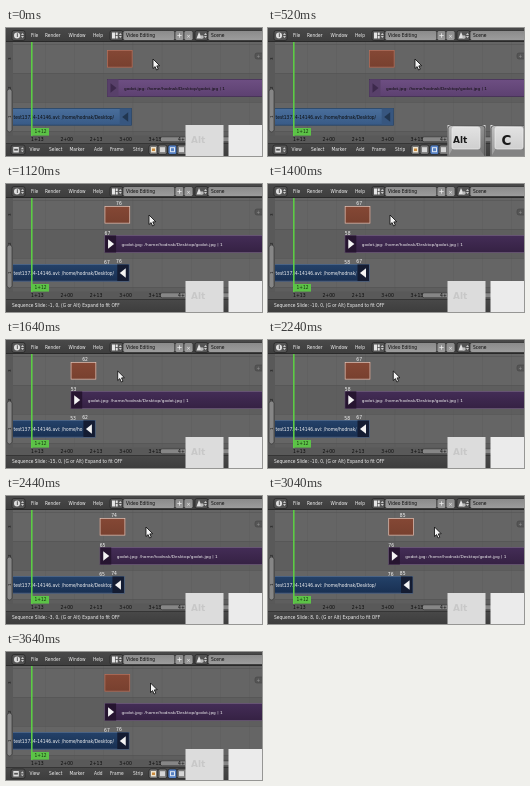
Recreate the animation shown at these times as an HTML page with a canvas. Size 256 px wide and 128 px high, loop 3880 ms.

```html
<!DOCTYPE html>
<html lang="en">
<head>
<meta charset="utf-8">
<title>Sequencer slide</title>
<style>
html, body { margin: 0; width: 100%; height: 100%; overflow: hidden; background: #555; }
canvas { display: block; width: 256px; height: 128px; }
</style>
</head>
<body>
<canvas id="stage" width="256" height="128"></canvas>
<script>
const g = document.getElementById('stage').getContext('2d');
const LOOP = 3880, STEP = 40, FRAME_W = 2.42;
const SELECT_AT = 600, GRAB_AT = 1000, DROP_AT = 3600;
const PATH = '/home/hodnak/Desktop';

// Time and value pairs
const slide = [[0, 0], [1000, 0], [1120, -1], [1400, -10], [1640, -15], [2080, -15],
  [2440, -3], [2680, 5], [2880, 8], [3040, 8], [3320, 3], [3560, -1], [LOOP, -1]];
const pointer = [[0, 147], [960, 147], [1120, 143], [1400, 122], [1680, 110], [2000, 110],
  [2080, 113.5], [2440, 140], [2680, 159], [2880, 166.5], [3040, 166.5], [3320, 154],
  [3560, 144.5], [LOOP, 144.5]];
const keyFade = [[0, 0], [120, 0], [360, 1], [600, 1], [840, 0], [LOOP, 0]];

function at(track, t) {
  let i = 1;
  while (i < track.length - 1 && track[i][0] < t) i++;
  const [t0, a] = track[i - 1], [t1, b] = track[i];
  return a + (b - a) * Math.min(1, Math.max(0, (t - t0) / (t1 - t0)));
}

function box(x, y, w, h, fill, line) {
  g.fillStyle = fill;
  g.fillRect(x, y, w, h);
  if (line) {
    g.strokeStyle = line;
    g.lineWidth = 0.7;
    g.strokeRect(x + 0.35, y + 0.35, w - 0.7, h - 0.7);
  }
}

function pill(x, y, w, h, fill, line, r = 2) {
  g.beginPath();
  g.roundRect(x, y, w, h, r);
  g.fillStyle = fill;
  g.fill();
  if (line) {
    g.strokeStyle = line;
    g.lineWidth = 0.7;
    g.stroke();
  }
}

function shape(points, fill, line) {
  g.beginPath();
  points.forEach(([x, y]) => g.lineTo(x, y));
  g.closePath();
  g.fillStyle = fill;
  g.fill();
  if (line) {
    g.strokeStyle = line;
    g.lineWidth = 0.8;
    g.stroke();
  }
}

function text(s, x, y, color = '#f0f0f0', size = 4.35, weight = '') {
  g.font = `${weight} ${size * 10}px "DejaVu Sans", sans-serif`;
  g.fillStyle = color;
  g.save();
  g.translate(x, y);
  g.scale(0.1, 0.1);
  g.fillText(s, 0, 0);
  g.restore();
}

function shade(y0, y1, top, bottom) {
  const grad = g.createLinearGradient(0, y0, 0, y1);
  grad.addColorStop(0, top);
  grad.addColorStop(1, bottom);
  return grad;
}

function clipped(x, y, w, h, draw) {
  g.save();
  g.beginPath();
  g.rect(x, y, w, h);
  g.clip();
  draw();
  g.restore();
}

function arrows(x, y, color = '#ccc') {
  shape([[x - 1.5, y - 0.6], [x, y - 2.5], [x + 1.5, y - 0.6]], color);
  shape([[x - 1.5, y + 0.6], [x, y + 2.5], [x + 1.5, y + 0.6]], color);
}

function field(x, w, label) {
  pill(x, 2.5, w, 10, shade(2, 12, '#898989', '#9c9c9c'), '#2b2b2b');
  if (label) text(label, x + 3, 9.2, '#0c0c0c', 4.4);
}

function topBar() {
  box(0, 0, 256, 14, shade(0, 14, '#494949', '#3d3d3d'));
  box(0, 13.3, 256, 0.7, '#222');
  pill(6, 2.5, 13, 10, '#555', '#252525');
  g.beginPath();
  g.arc(11, 7.5, 3, 0, 7);
  g.fillStyle = '#e0e0e0';
  g.fill();
  text('i', 10.4, 9.1, '#333', 4.5, 'bold');
  arrows(16.5, 7.5);
  [['File', 25], ['Render', 39], ['Window', 62.5], ['Help', 87]]
    .forEach(([s, x]) => text(s, x, 9.2));

  pill(104, 2.5, 13, 10, '#555', '#252525');
  box(106, 4.5, 3, 6, '#e4e4e4');
  box(109.7, 4.5, 2, 2.6, '#e4e4e4');
  box(109.7, 7.9, 2, 2.6, '#e4e4e4');
  arrows(114.3, 7.5);
  field(117, 52, 'Video Editing');
  field(169, 9);
  box(171.3, 7.1, 4.4, 0.8, '#e8e8e8');
  box(173.1, 5.3, 0.8, 4.4, '#e8e8e8');
  field(178, 9);
  text('×', 180.2, 9.5, '#e8e8e8', 5.5);

  pill(189, 2.5, 13, 10, '#555', '#252525');
  shape([[193, 4], [196, 10.5], [190.5, 10.5]], '#e0e0e0');
  g.beginPath();
  g.arc(196, 9, 1.7, 0, 7);
  g.fillStyle = '#bbb';
  g.fill();
  arrows(199.5, 7.5);
  field(202, 58, 'Scene');
}

function bottomBar(d, grabbing) {
  box(0, 115, 256, 13, shade(115, 128, '#494949', '#3d3d3d'));
  box(0, 115, 256, 0.6, '#292929');
  if (grabbing) {
    text(`Sequence Slide: ${d}, 0, (G or Alt) Expand to fit OFF`, 6, 123.4);
    return;
  }
  pill(5, 117, 14, 9.5, '#555', '#252525');
  box(7.3, 119, 5.5, 5.5, '#e0e0e0');
  box(8.2, 120.8, 3.7, 1.8, '#555');
  arrows(16.3, 121.8);
  [['View', 23.5], ['Select', 43], ['Marker', 63.5], ['Add', 88], ['Frame', 104], ['Strip', 127]]
    .forEach(([s, x]) => text(s, x, 123.4));
  pill(143, 117, 9, 9.5, '#777', '#222');
  box(145, 119, 5, 5.5, '#eee4cf');
  box(146, 120.5, 3, 2.5, '#c98a3c');
  pill(152, 117, 9, 9.5, '#777', '#222');
  box(154, 119.2, 5, 5, '#d5d5d5');
  pill(162, 117, 9, 9.5, '#5680c2', '#222');
  box(164, 119.2, 5, 5, '#dce5f1');
  box(165, 120.2, 3, 3, '#5680c2');
  pill(171, 117, 12, 9.5, '#777', '#222');
  box(173, 119.2, 5, 5, '#d5d5d5');
}

function backdrop() {
  box(0, 14, 256, 101, '#656565');
  for (let y = 45; y < 108; y += 58) box(0, y, 256, 29, '#5e5e5e');
  for (let i = 0; i < 8; i++) box(39 + i * 29.2, 14, 0.5, 93, '#59595988');
  [16, 45, 74, 103].forEach(y => box(0, y, 256, 0.5, '#505050'));
  pill(249, 25, 10, 6, '#555', '#484848');
  text('+', 250.5, 29.5, '#999', 4.5);
}

function rulers() {
  box(0, 14, 7, 101, '#595959');
  pill(1, 61, 5, 43, '#868686', '#393939', 2.5);
  ['3', '2', '1'].forEach((s, i) => {
    g.save();
    g.translate(5.4, 32 + i * 29);
    g.rotate(-Math.PI / 2);
    text(s, 0, 0, '#111', 4);
    g.restore();
  });
  box(0, 107.5, 256, 7.5, '#595959');
  pill(154, 108.8, 110, 5, '#868686', '#393939', 2.5);
  ['1+13', '2+00', '2+13', '3+00', '3+13', '4+00']
    .forEach((s, i) => text(s, 25 + i * 29.4, 113, '#0c0c0c', 4.6));
  box(25, 14, 1.6, 94, '#5ccb45');
  box(26, 100, 17, 7.6, '#5cc247');
  text('1+12', 28.5, 105.4, '#15300f', 4.4);
}

function strips(d, selected, grabbing, labels) {
  const x = 101 + d * FRAME_W, end = x + 24.7;
  const ink = selected ? '#f2f2f2' : '#0c0c0c';

  box(x, 22, 25.5, 17.5, shade(22, 39, '#854835', '#78402f'), grabbing ? '#e0c8be' : '#b57663');

  box(x, 51, 260 - x, 18, selected ? shade(51, 69, '#442d57', '#352143')
    : shade(51, 69, '#6e4f83', '#5c4070'), selected ? '#75667f' : '#41304f');
  box(x + 0.5, 51.5, 11, 17, selected ? '#261530' : '#58406a');
  shape([[x + 3.5, 55.2], [x + 9.5, 60], [x + 3.5, 64.8]], selected ? '#f3f3f3' : '#3d294c');
  text(`godot.jpg: ${PATH}/godot.jpg | 1`, x + 17, 62, ink, 4.25);

  box(0, 80, end, 17.5, selected ? shade(80, 97, '#24426a', '#193052')
    : shade(80, 97, '#4a6f9c', '#385a86'), selected ? '#5a7190' : '#263e5b');
  box(end - 12, 80.5, 11.5, 16.5, selected ? '#141c32' : '#37567f');
  shape([[end - 3.5, 84.2], [end - 9.5, 89], [end - 3.5, 93.8]], selected ? '#f3f3f3' : '#213650');
  clipped(7, 80, end - 20, 17, () =>
    text(`test13734-14146.avi: ${PATH}/`, 7.5, 90.7, ink, 4.35));

  if (!labels) return;
  const left = 68 + d, right = 77 + d;
  if (grabbing) {
    text(right, x + 11.5, 20.7, '#f4f4f4', 4.5);
    text(left, x, 51, '#f4f4f4', 4.5);
  }
  text(left, x - 0.5, 80.3, '#f4f4f4', 4.5);
  text(right, x + 11.5, 78.7, '#f4f4f4', 4.5);
}

function mouse(x) {
  g.save();
  g.translate(x, 31);
  shape([[0, 0], [0, 9.5], [2.1, 7.6], [3.6, 11], [5.3, 10.2], [3.8, 6.9], [6.7, 6.7]],
    '#f4f4f4', '#0a0a0a');
  g.restore();
}

function keyLabel(key, alpha) {
  g.globalAlpha = alpha;
  text(key.label, key.x + key.inset, key.base, '#1b1b1b', key.size, 'bold');
}

const keys = [
  { x: 179.5, label: 'Alt', inset: 5.5, base: 114.7, size: 9, blank: '#dcdcdc', ghost: 0.1 },
  { x: 222.5, label: 'C', inset: 11, base: 116.5, size: 13.5, blank: '#ebebeb', ghost: 0 },
];

function keycap(key, alpha) {
  const { x } = key, w = 38;
  box(x, 97, w, 32, key.blank);
  keyLabel(key, key.ghost);
  g.globalAlpha = alpha;
  const bevel = g.createLinearGradient(x, 97, x + w, 129);
  bevel.addColorStop(0, '#c2c2c2');
  bevel.addColorStop(1, '#6a6a6a');
  pill(x + 0.5, 97.5, w - 1, 34, bevel, '#303030', 3);
  shape([[x + 1, 128], [x + 5, 121], [x + w - 6, 121], [x + w - 1, 128]], '#838383');
  pill(x + 4.5, 99, w - 10, 22, shade(99, 121, '#e2e2e2', '#cfcfcf'), '#ededed', 2);
  keyLabel(key, alpha);
  g.globalAlpha = 1;
}

function draw(t) {
  const d = Math.round(at(slide, t));
  const selected = t >= SELECT_AT;
  const grabbing = t >= GRAB_AT && t < DROP_AT;
  const fade = at(keyFade, t);
  backdrop();
  strips(d, selected, grabbing, t >= GRAB_AT);
  rulers();
  topBar();
  bottomBar(d, grabbing);
  mouse(at(pointer, t));
  keys.forEach(key => keycap(key, fade));
}

const start = performance.now();
function tick() {
  const t = (performance.now() - start) % LOOP;
  draw(Math.floor(t / STEP) * STEP);
  requestAnimationFrame(tick);
}
tick();
</script>
</body>
</html>
```
